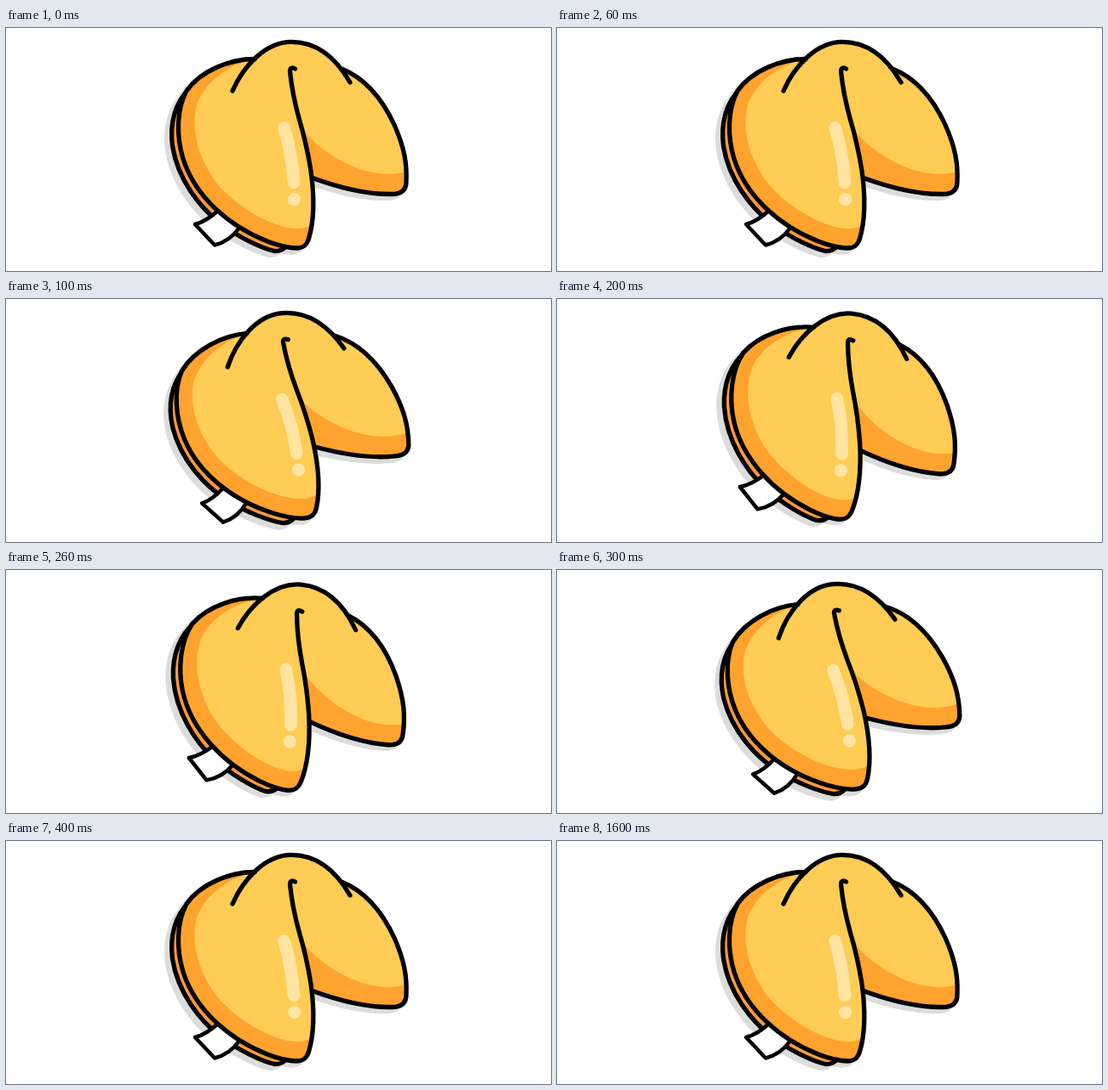
An HTML page with a canvas for the animation above (2.4 s loop, 640 px wide and 286 px high).

```html
<!DOCTYPE html>
<html lang="en">
<head>
<meta charset="utf-8">
<title>Fortune cookie</title>
<style>
html, body { margin: 0; width: 100%; height: 100%; overflow: hidden; background: #fff; }
canvas { display: block; width: 640px; height: 286px; }
</style>
</head>
<body>
<canvas id="stage"></canvas>
<script>
const LOOP = 2400, STEP = 100;
const TILT = [0, -5, 5, -5, 0];
const PIVOT = { x: 333, y: 143 };
const INK = '#000', LIGHT = '#ffcc55', SHADE = '#ffa32e', INNER = '#ff9a3d';
const SHADOW = '#dcdcdc', SHINE = '#ffe5a3';

const canvas = document.getElementById('stage');
const ctx = canvas.getContext('2d');
const ratio = window.devicePixelRatio || 1;
canvas.width = 640 * ratio;
canvas.height = 286 * ratio;

const path = d => new Path2D(d);

const frontEdge = 'M292 36.5C263 36.5 229 50 212 74C200 96 200 128 208 154' +
  'C222 198 261 233 308 251.5C320 256 333 259 341 259C349 259 353 256 355.5 248' +
  'C361.5 228 362.5 200 358 168C354 143 350.5 128 344.5 108C339.5 90 335.5 72 333.5 51';
const backEdge = 'M394 48C424 60 444 88 456 114C468 141 471 160 470 181' +
  'C470 191 464 195.5 453 195.5C425 196 390 187.5 360 176.5';

const shell = path('M216 71C198 88 192 113 195.5 139C202 179 227.5 211 251 229.5' +
  'C272 246 300 259 315 262.5C321 263 325 261 328 258');
const paper = path('M250 214Q235 228 222 231L245 255.5Q263 251 274 235Z');
const back = path(backEdge);
const backFill = path(backEdge + 'L320 60Z');
const backLight = path('M343 112C358 136 398 167 440 171.5Q456 173 472 169L480 30L320 30Z');
const front = path(frontEdge + 'C333.5 47 335.5 46 339.5 48');
const frontFill = path(frontEdge + 'Z');
const frontLight = path('M296 36C262 42 235 62 224 90C217 118 224 148 244 178' +
  'C264 206 312 237 343 236C350 236 354 234 362 231L364 160L340 30Z');
const hump = path('M266 74C278 46 304 16.4 335 16.4C366 16.4 388 36 404 64');
const shine = path('M326.5 117.5Q336 148 338 182');

function fill(shape, color) {
  ctx.fillStyle = color;
  ctx.fill(shape);
}

function line(shape, color = INK, width = 5.3) {
  ctx.strokeStyle = color;
  ctx.lineWidth = width;
  ctx.stroke(shape);
}

// Two-tone area: the light part is kept inside the outline.
function lobe(outline, light) {
  fill(outline, SHADE);
  ctx.save();
  ctx.clip(outline);
  fill(light, LIGHT);
  ctx.restore();
}

function drawShadow() {
  ctx.save();
  ctx.translate(-6, 5);
  for (const shape of [shell, backFill, frontFill]) {
    fill(shape, SHADOW);
    line(shape, SHADOW);
  }
  ctx.restore();
}

function drawCookie() {
  ctx.lineCap = ctx.lineJoin = 'round';
  drawShadow();
  fill(shell, INNER);
  line(shell);
  fill(paper, '#fff');
  line(paper, INK, 4.5);
  lobe(backFill, backLight);
  line(back);
  lobe(frontFill, frontLight);
  fill(hump, LIGHT);
  line(front);
  line(hump);
  line(shine, SHINE, 14.6);
  ctx.beginPath();
  ctx.arc(338.5, 201.6, 7.6, 0, Math.PI * 2);
  ctx.fillStyle = SHINE;
  ctx.fill();
}

function render(now) {
  const step = Math.min(Math.floor(now % LOOP / STEP), TILT.length - 1);
  ctx.setTransform(ratio, 0, 0, ratio, 0, 0);
  ctx.fillStyle = '#fff';
  ctx.fillRect(0, 0, 640, 286);
  ctx.translate(PIVOT.x, PIVOT.y);
  ctx.rotate(TILT[step] * Math.PI / 180);
  ctx.translate(-PIVOT.x, -PIVOT.y);
  drawCookie();
}

let start;
function tick(now) {
  start ??= now;
  render(now - start);
  requestAnimationFrame(tick);
}
render(0);
requestAnimationFrame(tick);
</script>
</body>
</html>
```
